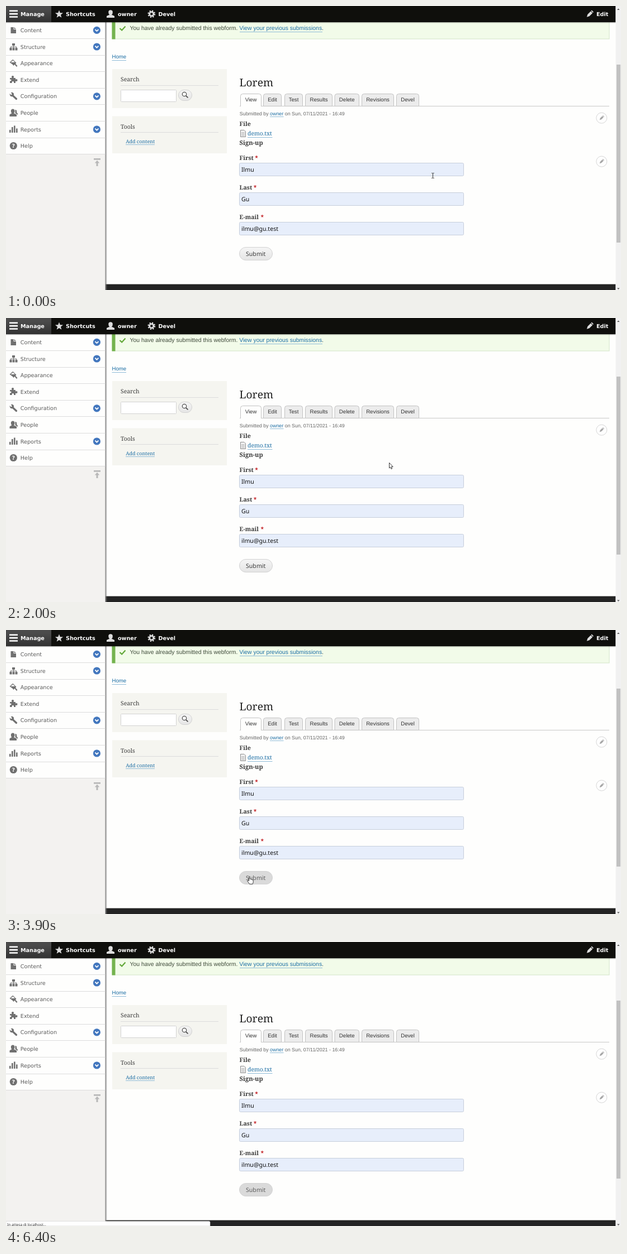
An HTML page for the animation above (8000 ms loop, 1100x509 px).

```html
<!DOCTYPE html>
<html lang="en">
<head>
<meta charset="utf-8">
<title>Webform submission</title>
<style>
  html, body { margin: 0; width: 100%; height: 100%; overflow: hidden; background: #fefefd; }
  svg { display: block; width: 1100px; height: 509px; text-rendering: geometricPrecision; }
  .bar { font: bold 9.65px "DejaVu Sans", sans-serif; fill: #fff; }
  .menu { font: 9.65px "DejaVu Sans", sans-serif; fill: #5c5c5c; }
  .msg { font: 10.42px "Liberation Sans", Arial, sans-serif; fill: #3f4a3a; }
  .tab { font: 9.65px "Liberation Sans", Arial, sans-serif; fill: #333; }
  .meta { font: 8.9px "Liberation Sans", Arial, sans-serif; fill: #656565; }
  .serif { font: 10.4px "Noto Serif", serif; fill: #3b3b3b; }
  .bold { font-weight: bold; font-size: 10.6px; }
  .small { font-size: 9px; }
  .title { font-size: 19.2px; fill: #222; }
  .input { font: 10.6px "Noto Sans", sans-serif; fill: #3a3a3a; }
  .value { font-weight: 500; fill: #111; }
  .status { font: 6.65px "Noto Sans", sans-serif; fill: #333; }
  .link { fill: #1c6ea4; }
  .under { stroke: #8fbbd7; }
  .rule { stroke: #dcdcdc; }
  .icon { fill: #707070; }
  .line { fill: none; stroke: #707070; stroke-width: 1.5; }
  .pill { stroke: #d2d2d2; }
</style>
</head>
<body>
<svg id="stage" viewBox="0 0 1100 509">
  <defs>
    <linearGradient id="active" x2="0" y2="1">
      <stop offset=".2" stop-color="#4b4b4b"/><stop offset="1" stop-color="#323232"/>
    </linearGradient>
    <linearGradient id="soft" x2="0" y2="1">
      <stop stop-color="#f5f5f5"/><stop offset="1" stop-color="#e5e5e5"/>
    </linearGradient>
    <linearGradient id="shade">
      <stop stop-color="#666" stop-opacity=".9"/><stop offset=".45" stop-color="#777" stop-opacity=".6"/>
      <stop offset="1" stop-color="#999" stop-opacity="0"/>
    </linearGradient>
    <linearGradient id="drop" x2="0" y2="1">
      <stop stop-opacity=".3"/><stop offset="1" stop-opacity="0"/>
    </linearGradient>
    <path id="pencil" d="M-2-6.5H2V-5H-2ZM-2-4.2H2V2.6L0 6.4-2 2.6Z" transform="rotate(45)"/>
    <g id="chevron">
      <circle r="6.6" fill="#4377be"/>
      <path d="M-3-1.3 0 1.7 3-1.3" fill="none" stroke="#fff" stroke-width="1.8"/>
    </g>
    <g id="edit">
      <circle r="9.5" fill="#fefefe" stroke="#d6d6d6"/>
      <use href="#pencil" fill="#a6a6a6" transform="scale(.78)"/>
    </g>
    <path id="required" d="M0-2.4V0L-1.5 2M0 0 1.5 2M-2.3-.8 0 0 2.3-.8" fill="none" stroke="#c9383c" stroke-width="1.1"/>
  </defs>

  <rect width="1100" height="509" fill="#fefefd"/>

  <!-- message -->
  <rect x="190" y="20" width="889" height="39" fill="#f2fbe9" stroke="#d3e6c8"/>
  <rect x="189.5" y="20" width="6" height="39.5" fill="#74b34f"/>
  <path d="M203.5 40 207.2 43.4 213.5 36.4" fill="none" stroke="#62a838" stroke-width="2.2"/>
  <text class="msg" x="221.5" y="43.2">You have already submitted this webform. <tspan class="link">View your previous submissions</tspan>.</text>
  <path class="under" d="M418 46.5H566M189.5 97.5H215"/>
  <text class="tab link" x="189.5" y="94.3">Home</text>

  <!-- side blocks -->
  <path d="M190 113H395V183H190ZM190 197.5H395V264H190Z" fill="#f5f5f0"/>
  <path class="rule" d="M205 142.5H380M205 226.5H380"/>
  <text class="serif" x="205" y="135.3">Search</text>
  <text class="serif" x="205" y="219.8">Tools</text>
  <text class="serif small link" x="214.3" y="246.2">Add content</text>
  <path class="under" d="M214 248.5H266"/>
  <rect x="205.5" y="150.5" width="99" height="21" rx="1" fill="#fff" stroke="#d2d2d2"/>
  <rect class="pill" x="308.5" y="150.5" width="24" height="19" rx="9.5" fill="url(#soft)"/>
  <circle cx="319" cy="158" r="3.7" fill="#fff" stroke="#4c4c4c" stroke-width="1.2"/>
  <path d="M321.8 160.8 325.5 164.4" stroke="#4c4c4c" stroke-width="1.8"/>

  <!-- content -->
  <text class="serif title" x="417.6" y="144">Lorem</text>
  <path d="M418 179.5H1079" stroke="#c8c8c8"/>
  <g id="tabs"></g>
  <text class="meta" x="417.8" y="195.7">Submitted by <tspan class="link">owner</tspan> on Sun, 07/11/2021 - 16:49</text>
  <path class="under" d="M472 198.5H496.5M432 235.5H476.5"/>
  <text class="serif bold" x="417.6" y="215.4">File</text>
  <path d="M419.5 222.5H426L428.5 225V234.5H419.5Z" fill="#f4f4f4" stroke="#8c8c8c"/>
  <path d="M421 226.5H427M421 228.5H427M421 230.5H427M421 232.5H427" stroke="#aaa" stroke-width=".8"/>
  <text class="serif link" x="432" y="232.4">demo.txt</text>
  <text class="serif bold" style="font-size:11.1px" x="417.6" y="248.8">Sign-up</text>
  <g id="fields"></g>
  <use href="#edit" x="1065.3" y="200.7"/>
  <use id="formEdit" href="#edit" x="1065.3" y="278.7"/>
  <rect id="submit" class="pill" x="417.5" y="432.5" width="59" height="23" rx="11.5"/>
  <text id="submitText" class="input" x="429" y="447.8">Submit</text>
  <rect x="178" y="498.6" width="912.5" height="11" fill="#242424"/>

  <!-- sidebar -->
  <rect y="29" width="178" height="480" fill="#f3f2f0"/>
  <rect y="29" width="178" height="236.5" fill="#fefefd"/>
  <rect x="177.5" y="29" width="3.5" height="480" fill="url(#shade)"/>
  <g id="menu"></g>
  <path d="M8.5 38H13.5V42H18V49H8.5ZM14.5 38 18 41H14.5Z" class="icon"/>
  <path d="M11 67H16V71H11ZM6.5 75H10.5V79.5H6.5ZM11.6 75H15.4V79.5H11.6ZM16.5 75H20.5V79.5H16.5Z" class="icon"/>
  <path d="M13.5 70V75.5M8.5 75.5V73.2H18.5V75.5" class="line" style="stroke-width:1.1"/>
  <path d="M6.5 101 12.3 95.8 18.5 102 13.3 107 11.5 104.5ZM15.5 105 17 103.5 20.5 107.5 18.8 109Z" class="icon"/>
  <path d="M8.3 101 12.5 97.4 15.8 101Z" fill="#fff"/>
  <path d="M7 129H10.5Q9 125 12 125T13.5 129H17V131.5Q20.5 130 20.5 133T17 134.5V138H14Q14.5 135 12.3 135T10.8 138H7V134.5Q9.5 135 9.5 133T7 131.7Z" class="icon"/>
  <path d="M11.5 160 18.5 166.5" class="line" style="stroke-width:3.2;stroke-linecap:round"/>
  <path d="M6.5 157 9.2 159.5 11 158 8.7 155.2Q12 153.8 13.6 156.5T12 162Q6.8 163.5 6.5 157Z" class="icon"/>
  <path d="M12 184.5Q15.5 184.5 15.5 188T13.8 192L19 194.5V198H6.5V194.5L10.5 192Q8.8 191 8.8 188T12 184.5ZM16.5 186Q20 186 19 190.5L21 193V195L16.5 192Z" class="icon"/>
  <path d="M6 222H8.6V227H6ZM10 217H12.6V227H10ZM14 214.5H16.6V227H14ZM18 219.5H20.6V227H18Z" class="icon"/>
  <circle cx="13.3" cy="250.5" r="6.6" class="icon"/>
  <text x="13.3" y="254" text-anchor="middle" class="bar">?</text>
  <path d="M157 273H169V275.8H157ZM163 276.8 167.3 281.5H164.5V287H161.5V281.5H158.7Z" fill="#b8b8b8"/>

  <!-- toolbar -->
  <rect y="29" width="1090.5" height="2.5" fill="url(#drop)"/>
  <rect width="1090.5" height="29" fill="#0f0f0c"/>
  <rect width="81" height="29" fill="url(#active)"/>
  <path d="M6 7.5H21V10H6ZM6 12.8H21V15.4H6ZM6 18.2H21V20.8H6Z" fill="#fff"/>
  <path id="favourite" fill="#ddd"/>
  <path d="M187 7.3Q190.8 7.3 190.8 11T188.8 15.5L194 18V21H180V18L185.2 15.5Q183.2 14.5 183.2 11T187 7.3Z" fill="#ddd"/>
  <g transform="translate(260.3 14.3)" fill="none" stroke="#ddd">
    <circle r="3.6" stroke-width="2.8"/>
    <circle r="5.7" stroke-width="2.4" stroke-dasharray="2.24 2.24"/>
  </g>
  <use href="#pencil" fill="#ddd" transform="translate(1044 14.5) scale(1.15)"/>
  <g id="toolbar"></g>

  <!-- scrollbar -->
  <rect x="1090.5" width="9.5" height="509" fill="#f1f1f1"/>
  <rect x="1092" y="105" width="7" height="319" fill="#c1c1c1"/>
  <path d="M1093 7 1095.3 4.5 1097.6 7ZM1093 505.5 1095.3 508 1097.6 505.5Z" fill="#555"/>

  <g id="status">
    <path d="M0 500.4H363Q365 500.4 365 502.4V509H0Z" fill="#fff" stroke="#ccc" stroke-width=".6"/>
    <text class="status" x="2" y="508.8">In attesa di localhost...</text>
  </g>

  <g id="cursor" stroke-linejoin="round">
    <path id="beam" d="M-2.2-4.5H-.7L0-4 .7-4.5H2.2M0-4V4M-2.2 4.5H-.7L0 4 .7 4.5H2.2" fill="none" stroke="#333"/>
    <path id="arrow" d="M.5.5V10L2.6 8.2 4 11.6 5.7 10.9 4.3 7.6H7.2Z" fill="#fff" stroke="#222" stroke-width=".9"/>
    <path id="hand" d="M3.6 8.5V1.6Q3.6.6 4.5.6T5.4 1.6V5.2Q7.2 4.8 7.4 6 9.2 5.6 9.4 6.7 11.2 6.4 11.2 8V10.5Q11.2 12 10 14.4H4.6Q3.2 12 .8 9.2.5 7.7 2 7.9Z" fill="#fff" stroke="#222" stroke-width=".9"/>
  </g>
</svg>
<script>
const $ = id => document.getElementById(id);
const fill = (id, rows, draw) => { $(id).innerHTML = rows.map(draw).join(''); };

fill('toolbar', [['Manage', 26], ['Shortcuts', 107], ['owner', 200], ['Devel', 272.5], ['Edit', 1056]],
  ([name, x]) => `<text class="bar" x="${x}" y="17.8">${name}</text>`);

const opening = ['Content', 'Structure', 'Configuration', 'Reports'];
fill('menu', ['Content', 'Structure', 'Appearance', 'Extend', 'Configuration', 'People', 'Reports', 'Help'],
  (name, i) => {
    const y = 43.4 + i * 29.6;
    return `<text class="menu" x="25.8" y="${y + 3.6}">${name}</text>
      <path class="rule" d="M0 ${Math.round(y + 14.6) + .5}H177.5"/>` +
      (opening.includes(name) ? `<use href="#chevron" x="162.4" y="${y}"/>` : '');
  });

fill('tabs', [['View', 419, 38], ['Edit', 460, 33], ['Test', 498, 33], ['Results', 535, 49],
  ['Delete', 587.5, 44.5], ['Revisions', 636, 58], ['Devel', 698, 41]],
  ([name, x, w], i) => `<path d="M${x + .5} ${i ? 179.5 : 180}V161.5q0-4 4-4h${w - 9}q4 0 4 4V${i ? '179.5Z' : 180}"
      fill="${i ? '#ececec' : '#fefefd'}" stroke="#c2c2c2"/>
    <text class="tab" text-anchor="middle" x="${x + w / 2}" y="171.2">${name}</text>`);

fill('fields', [['First', 'Ilmu', 448], ['Last', 'Gu', 445.5], ['E-mail', 'ilmu@gu.test', 458.3]],
  ([label, value, star], i) => {
    const y = 281.5 + i * 53;
    return `<text class="serif bold" x="417.6" y="${y - 5.6}">${label}</text>
      <use href="#required" x="${star}" y="${y - 11.2}"/>
      <rect x="417.5" y="${y}" width="401" height="23" rx="2" fill="#e7eefb" stroke="#c6cedb"/>
      <text class="input value" x="421" y="${y + 15.3}">${value}</text>`;
  });

const points = [...Array(10)].map((_, k) => {
  const r = k % 2 ? 3.1 : 7.4, a = k * Math.PI / 5;
  return `${95 + r * Math.sin(a)} ${14.8 - r * Math.cos(a)}`;
});
$('favourite').setAttribute('d', `M${points.join('L')}Z`);

const LOOP = 8000;
// start time, pointer shape, x, y
const moves = [
  [0, 'beam', 763.5, 304], [100, 'beam', 752, 303], [200, 'beam', 726, 301], [300, 'beam', 697, 299],
  [400, 'beam', 679.5, 298], [600, 'beam', 673, 294], [700, 'beam', 667.5, 291], [900, 'beam', 663.5, 290],
  [1300, 'beam', 664, 288.5], [1400, 'beam', 668, 283], [1500, 'arrow', 674, 274], [1600, 'arrow', 680, 266],
  [1700, 'arrow', 683, 261.5], [1800, 'arrow', 684, 259.5], [2000, 'arrow', 685, 259],
  [3000, 'arrow', 672, 252], [3100, 'arrow', 622, 251], [3200, 'arrow', 550, 268], [3300, 'arrow', 489, 293],
  [3500, 'arrow', 456.5, 326], [3600, 'beam', 426.5, 389],
  [3800, 'hand', 429, 435], [3900, 'hand', 431, 441], [4000, 'hand', 433.5, 443], [4100, 'hand', 435.5, 444.2],
  [4500, 'hand', 435, 444], [6400, 'none', 0, 0]
];
const show = (id, on) => $(id).setAttribute('visibility', on ? 'visible' : 'hidden');

function draw(t) {
  const [, shape, x, y] = moves.findLast(m => m[0] <= t);
  $('cursor').setAttribute('transform', `translate(${x} ${y})`);
  for (const id of ['beam', 'arrow', 'hand']) show(id, id === shape);
  show('formEdit', t < 1700 || t >= 3200);
  $('status').setAttribute('opacity', t < 4500 ? 0 : t < 4600 ? .5 : 1);
  const hover = t >= 3800;
  $('submit').setAttribute('fill', hover ? '#dadada' : 'url(#soft)');
  $('submitText').style.fill = hover ? '#5c5c5c' : '#3a3a3a';
}

const start = performance.now();
function tick() {
  draw((performance.now() - start) % LOOP);
  requestAnimationFrame(tick);
}
tick();
</script>
</body>
</html>
```
